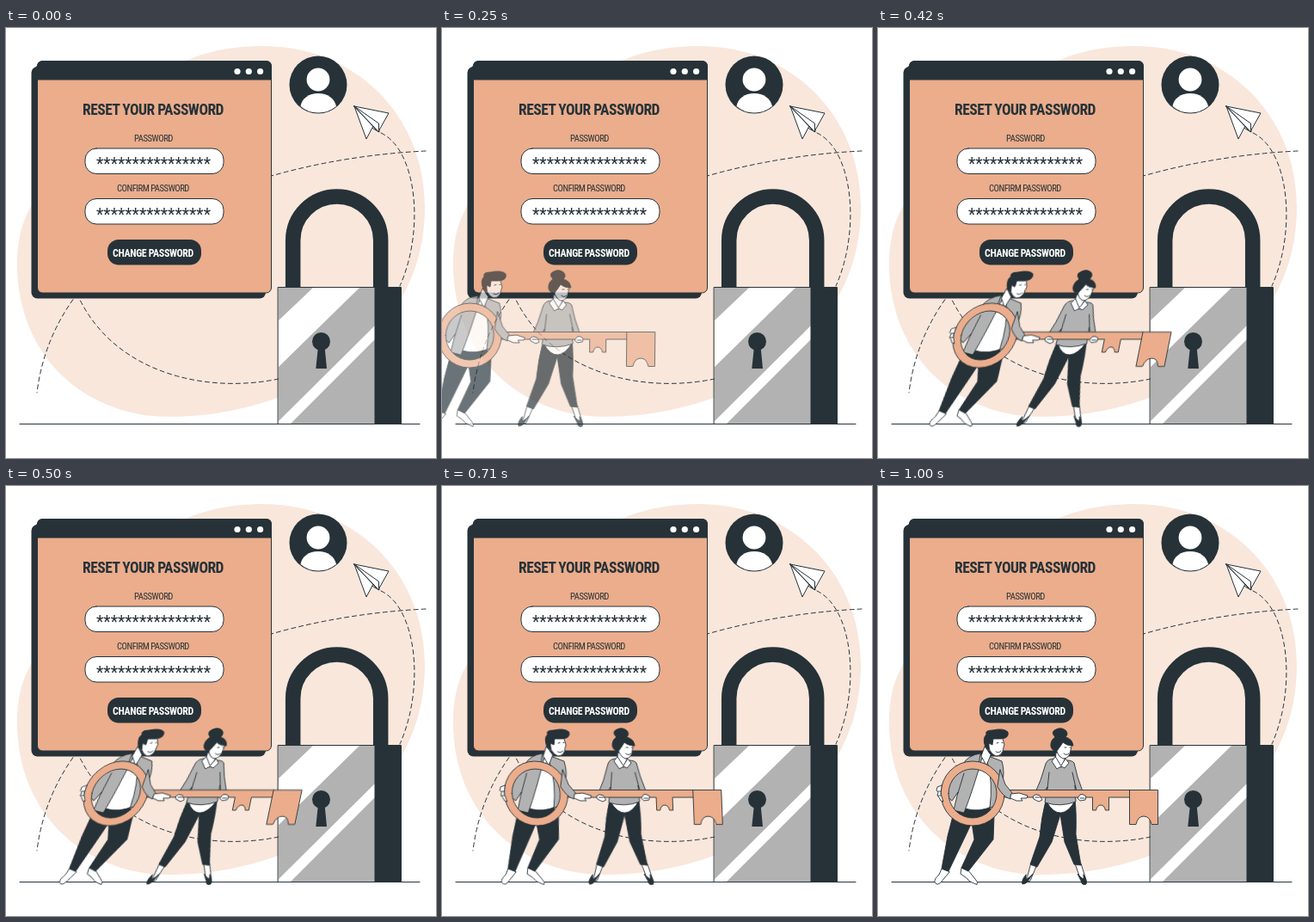
Write an HTML page that moves like this. It is 500 by 500 pixels and loops after 1040 ms.

```html
<!DOCTYPE html>
<html lang="en">
<head>
<meta charset="utf-8">
<title>Reset your password</title>
<style>
  html, body { margin: 0; width: 100%; height: 100%; overflow: hidden; background: #fff; }
  svg { display: block; width: 100%; height: 100%; }
  text { font-family: "Roboto Condensed", Roboto, sans-serif; font-stretch: condensed; letter-spacing: -.045em; text-anchor: middle; fill: #263238; }
  .bold { font-weight: 600; letter-spacing: -.03em; }
  .stars { font-family: Roboto, sans-serif; font-stretch: normal; letter-spacing: 0; }
  .d { fill: #263238; }
  .w { fill: #fff; }
  .p { fill: #ebad8c; }
  .g { fill: #b2b2b2; }
  .l { stroke: #263238; stroke-linejoin: round; stroke-linecap: round; }
  .n { fill: none; }
  #crew { transform-origin: 0 373px; stroke-width: .9; }
</style>
</head>
<body>
<svg viewBox="0 0 500 500">
  <path fill="#f9e7dc" d="M300 21C402 21 487 98 487 208C487 262 470 300 450 330C410 395 310 452 190 452C90 452 13 380 13 275C13 247 18 226 30 206L110 110C170 60 205 21 300 21Z"/>

  <g class="l n" stroke-dasharray="5 4" stroke-linecap="butt">
    <path d="M488 143C300 152 60 230 36 424"/>
    <path d="M436 122C478 142 487 235 458 300"/>
    <path d="M317 408C230 426 125 400 84 312"/>
  </g>

  <!-- window -->
  <rect class="d" x="29.500" y="45" width="272.500" height="269.500" rx="7"/>
  <path class="d" d="M30 52L38 41L60 60Z"/>
  <rect class="p l" x="36.500" y="38.500" width="272" height="269.500" rx="6"/>
  <path class="d" d="M36 60.500V45Q36 38 43 38H302Q309 38 309 45V60.500Z"/>
  <g class="w">
    <circle cx="269" cy="50.500" r="3.600"/><circle cx="282.300" cy="50.500" r="3.600"/><circle cx="295.600" cy="50.500" r="3.600"/>
  </g>
  <g class="w l">
    <rect x="92" y="140" width="161" height="29.500" rx="13"/>
    <rect x="92" y="198.500" width="161" height="29.500" rx="13"/>
  </g>
  <rect class="d" x="118" y="246" width="109" height="29.500" rx="13"/>
  <text class="bold" x="171" y="100.500" data-width="164">RESET YOUR PASSWORD</text>
  <text x="171.500" y="131.800" data-width="45">PASSWORD</text>
  <text x="171" y="190.300" data-width="84">CONFIRM PASSWORD</text>
  <text class="stars" x="171.500" y="165" data-width="133">****************</text>
  <text class="stars" x="171.500" y="223.500" data-width="133">****************</text>
  <text class="bold" x="171" y="265.500" data-width="94" style="fill:#fff">CHANGE PASSWORD</text>

  <!-- avatar -->
  <circle class="d" cx="363" cy="66" r="33.500"/>
  <circle class="w" cx="363" cy="60" r="13.400"/>
  <path class="w" d="M342.500 91C344 82 352 76 363 76S382 82 384 91Q375 98.500 363 98.500T342.500 91Z"/>

  <!-- paper plane -->
  <g class="w l">
    <path d="M405 91L433 111L434 121L427 117Z"/>
    <path d="M405 91L419 129L427 114Z"/>
    <path d="M405 91L445 99L433 120.500Z"/>
    <path d="M405 91L433.500 111V121L427 114Z"/>
  </g>

  <!-- padlock -->
  <path class="n" stroke="#263238" stroke-width="17.500" d="M333.700 303V247a51 51 0 0 1 102 0V303"/>
  <path class="g" d="M317 302H429V460H317Z"/>
  <path class="w" d="M357 302H411L317 394V340ZM429 346V362L331 460H317V457Z"/>
  <path class="d" d="M428.500 302H459.500V460H428.500Z"/>
  <path class="l n" d="M316.500 301.500H459.500V460.500H316.500Z"/>
  <circle class="d" cx="366.500" cy="364.500" r="10.500"/>
  <path class="d" d="M363 370H370.500L373 396H360.300Z"/>

  <path class="l" d="M16 460.500H481"/>

  <g id="crew">
    <!-- man -->
    <g class="l">
      <path class="w" d="M74 445L71 452Q65 457 66 461Q69 465 73 461L83 449Z"/>
      <path class="w" d="M97 444L96 451Q103 455 107 460L115 463.500Q117 461 113 457L105 447Z"/>
      <path class="d" d="M90 372L81 407L74 445L82 448L104 402L109 391L112 411L97 444L105 448L134 411L135 384L130 374Z"/>
      <path class="w" d="M111 317L130 317L134 372Q118 380 101 375L98 345Z"/>
      <path class="g" d="M119 311Q105 313 99 323L82 348L77 358L86 366L93 356L88 377L100 380Q111 352 121 316Z"/>
      <path class="g" d="M131 315L144 320Q148 333 144 347L137 372L130 374Q134 345 127 320Z"/>
      <path class="n" d="M100 334L93 357M119 312L117 324L123 322"/>
      <path class="w" d="M124 303L120 314L126 325L131 313Z"/>
      <path class="w" d="M128 294Q127 310 137 314Q145 314 146 304L147 301L145 294L139 289Z"/>
      <path class="d" d="M125 304Q121 293 126 289Q124 284 133 284Q146 281 151 286Q153 293 143 294L134 294L133 301L129 299L129 307Z"/>
      <path class="n" d="M138 299l2 -.5M144 298.500l1 0M137 309Q141 311 143 308"/>
    </g>
    <!-- woman -->
    <g class="l">
      <path class="w" d="M178 438L174 453L169 462L177 459L185 440ZM229 439L234 453L241 462L241 455L236 439Z"/>
      <path class="d" d="M195 366Q190 385 188 408L177 440L185 443L202 414L212 382L217 414L228 440L236 441L230 405Q231 382 229 364Z"/>
      <path class="d" d="M172 452Q166 459 168 463Q173 463 176 457L180 451Q176 456 172 457ZM239 452Q244 459 242 463Q237 465 236 459L232 451Q236 456 239 457Z"/>
      <path class="w" d="M196 367Q204 381 213 380T229 366Z"/>
      <path class="w" d="M207 310L206 320L213 328L218 315Z"/>
      <path class="g" d="M205 317Q197 317 195 323L189 342L183 356L189 361L197 350L194 368Q212 374 230 367L229 348L233 361L239 358L232 338L228 322Q226 319 219 319L213 327Z"/>
      <path class="n" d="M199 333L197 352M226 333L230 351"/>
      <path class="w" d="M206 315L202 320L208 329L213 326L217 328L222 322L218 317L213 325Z"/>
      <path class="w" d="M207 298Q206 313 215 317Q223 317 224 307L225 303L222 296Z"/>
      <path class="d" d="M206 292Q200 286 207 283Q213 280 218 284Q222 288 218 292Q226 294 227 302Q219 302 215 298Q212 303 208 308Q203 309 201 303Q200 296 206 292Z"/>
      <path class="n" d="M217 304l2 0M223 304l.5 0M216 311Q219 314 222 311"/>
    </g>
    <!-- key -->
    <g class="p l">
      <path d="M146 353.500H325.500V393.500H318Q316 384 309 384T300 393.500H292.500V362H268.500V377H264.500Q263 371 259 371T253.500 377H249.500V362H146Z"/>
      <path class="n" d="M292.500 362V353.500"/>
      <path fill-rule="evenodd" d="M73 357.500a37 37.500 0 1 0 74 0a37 37.500 0 1 0 -74 0ZM82 357.500a28 28.500 0 1 1 56 0a28 28.500 0 1 1 -56 0Z"/>
    </g>
    <!-- hands -->
    <g class="w l">
      <path d="M74 348L69 350L68 354L70 356L69 360L71 362L73 366L76 367L73 358Z"/>
      <path class="n" d="M70 355H73M70 360H73"/>
      <path class="g" d="M142 330L148 347L156 357L154 364Q146 362 139 350Z"/>
      <path d="M155 358L164 357L174 360L173 363L166 363L168 366L161 366L154 363Z"/>
      <path d="M183 359L180 361L181 364L187 367L191 365L188 360Z"/>
      <path d="M235 359L232 363L235 366L241 365L242 361L239 359Z"/>
      <path class="n" d="M183 362H188M235 363H240"/>
    </g>
  </g>
</svg>
<script>
const LOOP = 1040, FRAME = 1000 / 24, LEAD = 33;

// Pick each font size so the line is as wide as its design width.
for (const t of document.querySelectorAll('text')) {
  t.style.fontSize = '100px';
  t.style.fontSize = 100 * t.dataset.width / t.getComputedTextLength() + 'px';
}

const pose = (offset, x, skew, opacity) =>
  ({ offset, opacity, transform: `translateX(${x}px) skewX(${skew}deg)`, easing: 'cubic-bezier(.36,-.01,.5,1.38)' });

const entrance = document.getElementById('crew').animate([
  pose(0, -250, 20, 0),
  pose(.6, 0, -10, 1),
  pose(.8, 0, 2, 1),
  pose(1, 0, 0, 1)
], { duration: 1000, fill: 'both' });
entrance.pause();

// The motion advances at 24 steps per second; the first two steps are empty.
function draw() {
  const step = Math.floor((performance.now() % LOOP + 5) / FRAME);
  entrance.currentTime = step < 2 ? 0 : Math.min(1000, step * FRAME + LEAD);
  requestAnimationFrame(draw);
}
draw();
</script>
</body>
</html>
```
